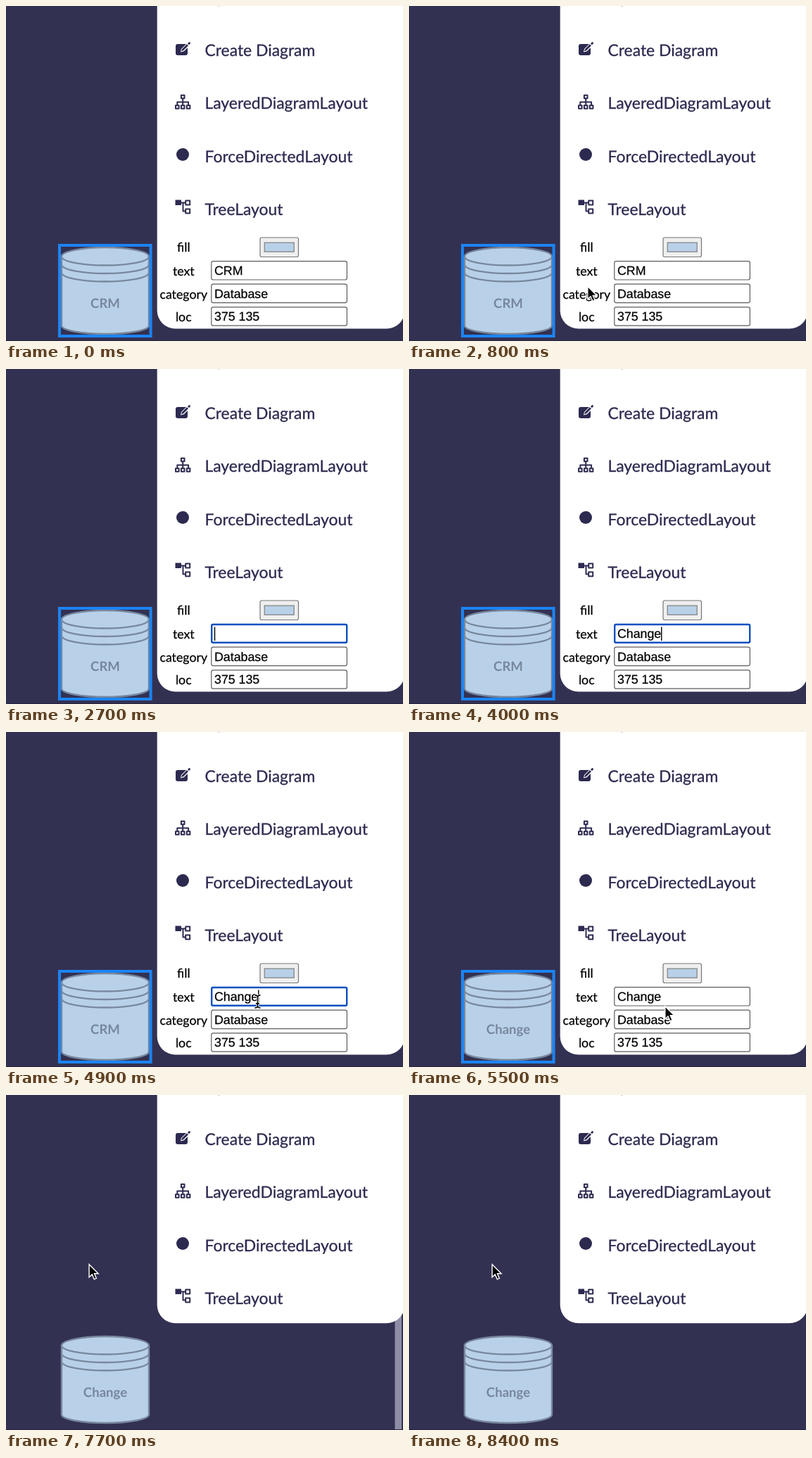
Recreate the animation shown at these times as an HTML page. Size 564x476 px, loop 9300 ms.

```html
<!DOCTYPE html>
<html lang="en">
<head>
<meta charset="utf-8">
<title>Diagram inspector</title>
<style>
  html, body { margin: 0; width: 100%; height: 100%; overflow: hidden; background: #333152; }
  svg { display: block; }
  text { white-space: pre; text-rendering: geometricPrecision; }
  .menu { font: 22.9px Lato, sans-serif; fill: #2d2a50; stroke: #2d2a50; stroke-width: .3; }
  .label { font: 17.8px Lato, sans-serif; fill: #000; stroke: #000; stroke-width: .25; text-anchor: middle; }
  .value { font: 17.78px Arial, "Liberation Sans", sans-serif; fill: #000; stroke: #000; stroke-width: .25; }
  .name { font: bold 18.6px Lato, sans-serif; fill: #76879d; text-anchor: middle; }
  .ink { fill: #2d2a50; }
  .line { fill: none; stroke: #2d2a50; stroke-width: 2; stroke-linejoin: round; }
  .box { fill: #fff; stroke: #5c5c5c; stroke-width: 1.2; }
</style>
</head>
<body>
<svg width="564" height="476" viewBox="0 0 564 476">
  <rect width="564" height="476" fill="#333152"/>
  <rect id="bar" x="552.5" y="290" width="9.5" height="185" fill="#8f8da6"/>
  <rect y="475" width="564" height="1" fill="#25243c"/>

  <g id="node">
    <path d="M79 356A62 13 0 0 1 203 356V454A62 12 0 0 1 79 454Z" fill="#b9d1e8"/>
    <g fill="none" stroke="#78889e" stroke-width="2.4">
      <path d="M79 356A62 13 0 0 1 203 356V454A62 12 0 0 1 79 454Z"/>
      <path d="M79 356A62 12.5 0 0 0 203 356M79 367.5A62 12.5 0 0 0 203 367.5M79 379A62 12.5 0 0 0 203 379"/>
    </g>
    <text id="name" class="name" x="141" y="429"></text>
    <rect id="select" x="76" y="340" width="129.6" height="129" fill="none" stroke="#1c84f3" stroke-width="4"/>
  </g>

  <rect id="panel" x="214.7" y="-60" width="351.8" rx="26" fill="#fff"/>
  <rect x="301" y="0" width="3" height="1" fill="#d4d3dc"/>
  <g id="menu"></g>

  <g>
    <rect class="ink" x="241" y="54" width="17" height="16" rx="3"/>
    <path d="M248 65.5L249 61L258 52L262 55.5L252.5 64.5Z" fill="#fff"/>
    <path class="ink" d="M249 64.3L250 61.2L257 54.3L259 56.3L252 63.3ZM258 53.3L260 51.3Q261 50.8 261.8 51.8Q262.3 52.8 261.5 53.8L259.9 55.3Z"/>
  </g>
  <path class="line" d="M248.9 126.7h4.6v4.6h-4.6zM251.2 131.3V141M243.3 141V136.5H259.1V141M241 141.2h4.6v4.6h-4.6zM248.9 141.2h4.6v4.6h-4.6zM256.8 141.2h4.6v4.6h-4.6z"/>
  <circle class="ink" cx="251" cy="211" r="9"/>
  <g>
    <rect class="ink" x="240.5" y="275.5" width="8.5" height="7.5"/>
    <path class="line" d="M249 279.5H255M251.5 279.5V291.5H255M255.2 276.5h6v6h-6zM255.2 288.6h6v6h-6z"/>
  </g>

  <g id="form">
    <rect x="361" y="329" width="54.5" height="27.5" rx="2.5" fill="#efefef" stroke="#777" stroke-width="1.2"/>
    <rect x="367.2" y="336.2" width="42" height="13" fill="#b9d1e8" stroke="#777" stroke-width="1.1"/>
    <g id="rows"></g>
    <rect id="ring" x="292.2" y="363" width="192" height="25.7" rx="2" fill="none" stroke="#0b50c0" stroke-width="2.4"/>
    <rect id="caret" y="366.5" width="1.4" height="19.5"/>
  </g>

  <path id="arrow" d="M.8 .8V18.8L5 15L8 21.8L11.1 20.5L8.2 13.8H13.8Z" fill="#000" stroke="#fff" stroke-width="1.4"/>
  <g id="beam" fill="none">
    <path d="M-4 -9Q0 -9 0 -6Q0 -9 4 -9M0 -6V6M-4 9Q0 9 0 6Q0 9 4 9M-2.5 3H2.5" stroke="#fff" stroke-width="3.4"/>
    <path d="M-4 -9Q0 -9 0 -6Q0 -9 4 -9M0 -6V6M-4 9Q0 9 0 6Q0 9 4 9M-2.5 3H2.5" stroke="#000" stroke-width="1.6"/>
  </g>
</svg>
<script>
const LOOP = 9300, STEP = 100;
const el = id => document.getElementById(id);
const show = (id, on) => el(id).setAttribute('visibility', on ? 'visible' : 'hidden');
const clamp = v => Math.max(0, Math.min(1, v));

el('menu').innerHTML = ['Create Diagram', 'LayeredDiagramLayout', 'ForceDirectedLayout', 'TreeLayout']
  .map((s, i) => `<text class="menu" x="282.5" y="${71 + i * 75.3}">${s}</text>`).join('');

el('rows').innerHTML = '<text class="label" x="252.3" y="349">fill</text>' +
  [['text', ''], ['category', 'Database'], ['loc', '375 135']].map(([key, value], i) => {
    const y = 362.6 + i * 32.6;
    return `<text class="label" x="252.3" y="${y + 20.4}">${key}</text>
      <rect class="box" x="291.8" y="${y}" width="192.6" height="26.4" rx="2.5"/>
      <text class="value" id="${key}" x="296" y="${y + 19.6}">${value}</text>`;
  }).join('');

// time, field value
const edits = [[0, 'CRM'], [1500, 'CRM'], [1900, 'CR'], [2300, 'C'], [2500, ''], [2800, 'C'],
  [3000, 'Ch'], [3200, 'Cha'], [3400, 'Chan'], [3600, 'Chang'], [3700, 'Change']];

// start, end, from point, to point, easing power
const moves = [
  [300, 1400, 17, 444, 353, 378, 2],
  [4500, 5400, 353, 378, 363, 389, 1],
  [6600, 7400, 363, 389, 117.3, 240, 4]
];

function pointer(t) {
  let p = [17, 444];
  for (const [a, b, x0, y0, x1, y1, n] of moves) {
    if (t < a) break;
    const k = 1 - Math.pow(1 - clamp((t - a) / (b - a)), n);
    p = [x0 + (x1 - x0) * k, y0 + (y1 - y0) * k];
  }
  return p;
}

function draw(t) {
  const [when, value] = edits.filter(e => e[0] <= t).pop();
  const focus = t >= 1500 && t < 5300;
  const open = t < 7600;
  el('text').textContent = value;
  el('name').textContent = t < 5300 ? 'CRM' : 'Change';
  const end = value ? el('text').getComputedTextLength() : 0;
  el('caret').setAttribute('x', 295.8 + end);
  el('panel').setAttribute('height', open ? 518.5 : 384.3);
  show('form', open);
  show('ring', open && focus);
  show('caret', focus && (t - when) % 1000 < 500);
  show('select', open);
  el('bar').setAttribute('opacity', open ? 0 : 1 - clamp((t - 7900) / 500));

  const [x, y] = pointer(t);
  const seen = t >= 400 && (t < 1900 || t >= 4400);
  const typing = x > 291 && x < 485 && y > 362 && y < 388;
  show('arrow', seen && !typing);
  show('beam', seen && typing);
  for (const id of ['arrow', 'beam']) el(id).setAttribute('transform', `translate(${x} ${y})`);
}

const start = performance.now();
function tick() {
  const t = (performance.now() - start) % LOOP;
  draw(Math.floor(t / STEP) * STEP);
  requestAnimationFrame(tick);
}
tick();
</script>
</body>
</html>
```
